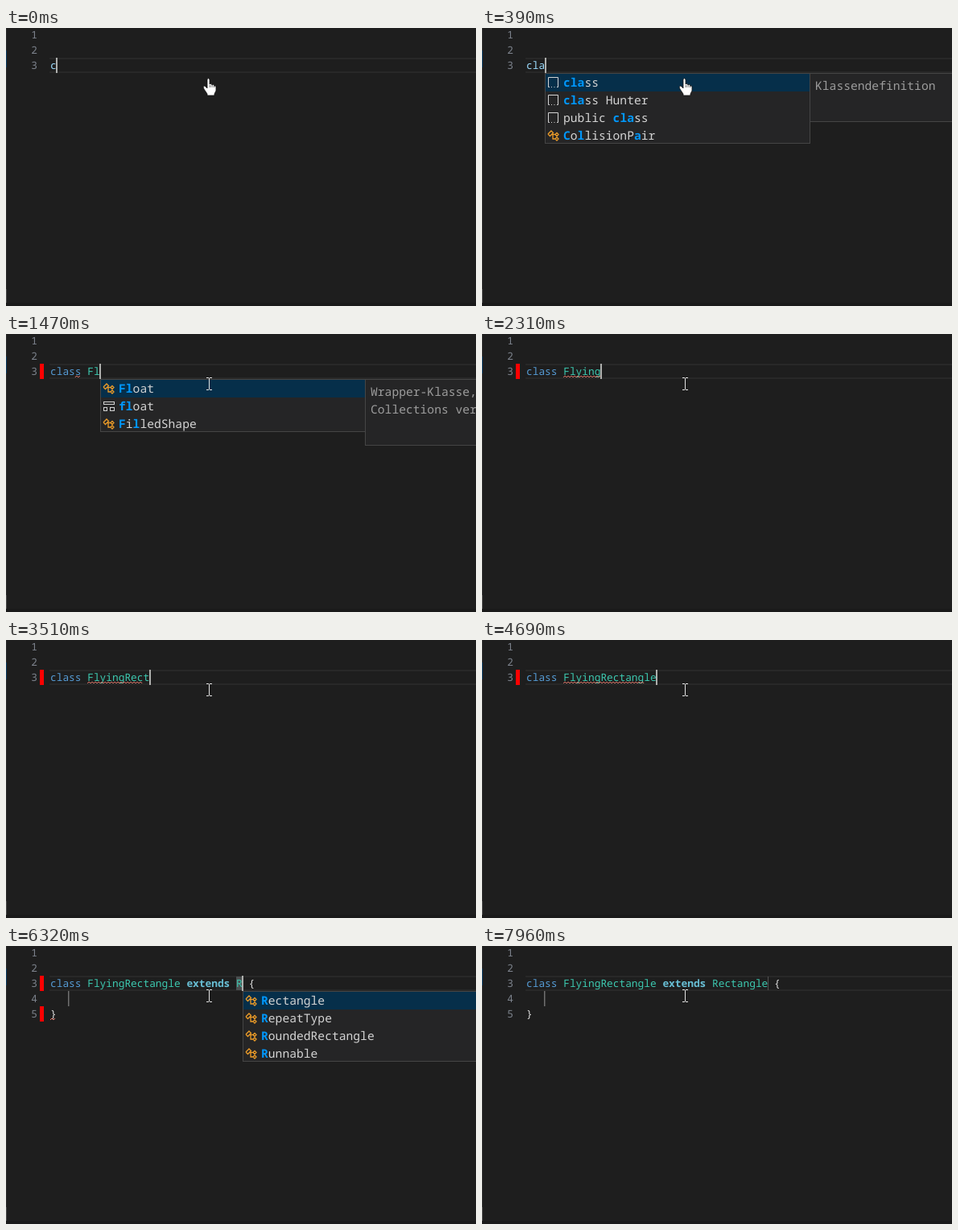
An HTML page with a canvas for the animation above (8000 ms loop, 584x346 px).

```html
<!DOCTYPE html>
<html lang="de">
<head>
<meta charset="utf-8">
<title>Code completion</title>
<style>
html, body { margin: 0; width: 584px; height: 346px; overflow: hidden; background: #1e1e1e; }
canvas { display: block; }
</style>
</head>
<body>
<canvas id="stage" width="584" height="346"></canvas>
<script>
const ctx = document.getElementById('stage').getContext('2d');
ctx.textRendering = 'geometricPrecision';

const LOOP = 8000;
const LEFT = 55, TOP = 37, LINE = 19, CELL = 7.7, ROW = 22, WIDTH = 330;
const FAMILY = '"Noto Sans Mono", "DejaVu Sans Mono", monospace';
const CODE = '12.83px ' + FAMILY, LIST = '14.66px ' + FAMILY;
const COLOR = {
  plain: '#d4d4d4', name: '#9cdcfe', word: '#569cd6', type: '#3dc9b0',
  clause: '#68bed4', match: '#0097fb', number: '#7d838d', edge: '#454545',
  panel: '#252526', focus: '#062f4a', icon: '#ee9d28', wave: '#ee7f70'
};

// Typing: time and the text in front of the caret
const HEAD = 'class FlyingRectangle ';
const typed = [
  [0, 'c'], [250, 'cl'], [390, 'cla'], [550, 'clas'], [680, 'class'], [820, 'class '],
  [1240, 'class F'], [1470, 'class Fl'], [1850, 'class Fly'], [1940, 'class Flyi'],
  [2030, 'class Flyin'], [2310, 'class Flying'], [2550, 'class FlyingR'],
  [2800, 'class FlyingRe'], [3030, 'class FlyingRec'], [3510, 'class FlyingRect'],
  [3630, 'class FlyingRecta'], [3750, 'class FlyingRectan'], [4050, 'class FlyingRectang'],
  [4160, 'class FlyingRectangl'], [4290, 'class FlyingRectangle'], [4920, HEAD],
  [5070, HEAD + 'e'], [5300, HEAD + 'ex'], [5500, HEAD + 'extends '],
  [6320, HEAD + 'extends R'], [6400, HEAD + 'extends Re'], [6550, HEAD + 'extends Rec'],
  [6630, HEAD + 'extends Rect'], [7030, HEAD + 'extends Rectangle']
];

// Suggestions: time, items (kind:label) and documentation lines
const classDoc = ['Klassendefinition', ''];
const floatDoc = ['Wrapper-Klasse, um', 'Collections verwenden', ''];
const lists = [
  [0, ''],
  [110, 's:class|s:class Hunter|s:public class|c:Camera|c:Character|c:Circle|c:Collidable|c:CollisionPair|c:Color|c:Comparable|p:char', classDoc],
  [250, 's:class|s:class Hunter|s:public class|c:Collidable|c:CollisionPair|c:Circle', classDoc],
  [390, 's:class|s:class Hunter|s:public class|c:CollisionPair', classDoc],
  [550, 's:class|s:class Hunter|s:public class', classDoc],
  [820, ''],
  [1240, 'c:Float|p:float|c:FilledShape|s:final|s:for', floatDoc],
  [1470, 'c:Float|p:float|c:FilledShape', floatDoc],
  [1550, ''],
  [5070, 's:extends|s:implements|s:extends {}', ['Erweitert Klasse', '']],
  [5300, 's:extends|s:extends {}', ['Erweitert Klasse', '']],
  [5500, ''],
  [5720, 'c:Actor|c:ArrayList|c:Bitmap|c:Boolean|c:Camera|c:Character|c:Circle|c:Collidable|c:CollisionPair|c:Color|c:Double|c:Ellipse'],
  [6320, 'c:Rectangle|c:RepeatType|c:RoundedRectangle|c:Runnable'],
  [6400, 'c:Rectangle|c:RepeatType|c:RoundedRectangle'],
  [6550, 'c:Rectangle|c:RoundedRectangle'],
  [7030, '']
];

// Error underline on the first code line: time, first and last column
const waves = [
  [0, 0, 0], [960, 4, 5], [1550, 6, 8], [2030, 6, 11], [2310, 6, 12], [3270, 6, 13],
  [3420, 6, 15], [3750, 6, 18], [4400, 6, 19], [5070, 0, 0]
];

const at = (track, t) => track.findLast(step => step[0] <= t);
const colX = col => LEFT + col * CELL;

function box(x, y, w, h, color) {
  ctx.fillStyle = color;
  ctx.fillRect(x, y, w, h);
}

function text(str, x, y, color, font) {
  ctx.font = font;
  ctx.fillStyle = color;
  ctx.fillText(str, x, y);
}

function code(str, col, line, color, bold) {
  text(str, colX(col), TOP + line * LINE + 14, color, (bold ? 'bold ' : '') + CODE);
}

function frame(x, y, w, h) {
  box(x, y, w, h, COLOR.edge);
  box(x + 1, y + 1, w - 2, h - 2, COLOR.panel);
}

function stroke(color, points, width = 1) {
  ctx.strokeStyle = color;
  ctx.lineWidth = width;
  ctx.beginPath();
  points.forEach(([x, y], i) => i ? ctx.lineTo(x, y) : ctx.moveTo(x, y));
  ctx.stroke();
}

function wave(from, to, line) {
  const end = colX(to), y = TOP + line * LINE + 16, points = [];
  for (let x = colX(from), i = 0; x <= end; x += 2, i++) points.push([x, y + (i % 2 ? -1 : 1)]);
  if (points.length > 1) stroke(COLOR.wave, points);
}

function icon(kind, x, y) {
  ctx.save();
  ctx.translate(x, y);
  if (kind === 's') {
    stroke(COLOR.plain, [[3, 13.5], [1.5, 13.5], [1.5, 1.5], [13.5, 1.5], [13.5, 13.5], [12, 13.5]]);
    stroke(COLOR.plain, [[5, 13.5], [6, 13.5]]);
    stroke(COLOR.plain, [[8.5, 13.5], [9.5, 13.5]]);
  } else if (kind === 'c') {
    const c = COLOR.icon;
    stroke(c, [[1, 6], [5, 2], [7.5, 4.5], [3.5, 8.5], [1, 6]], 1.3);
    stroke(c, [[6, 6.5], [11, 6.5]], 1.3);
    stroke(c, [[7, 6.5], [7, 12], [10, 12]], 1.3);
    for (const dy of [6.5, 12])
      stroke(c, [[10, dy], [12, dy - 2], [14, dy], [12, dy + 2], [10, dy]], 1.3);
  } else {
    ctx.strokeStyle = COLOR.plain;
    ctx.lineWidth = 1;
    ctx.strokeRect(1.5, 2.5, 13, 3);
    ctx.strokeRect(1.5, 9.5, 4, 4);
    ctx.strokeRect(9.5, 9.5, 5, 4);
  }
  ctx.restore();
}

// Indices of the letters that fit the word being typed
function hits(label, word) {
  const low = label.toLowerCase(), w = word.toLowerCase(), start = low.indexOf(w);
  const found = new Set();
  let pos = -1;
  [...w].forEach((ch, i) => {
    pos = start >= 0 ? start + i : low.indexOf(ch, pos + 1);
    found.add(pos);
  });
  return found;
}

function popup(col, [, items, doc], word) {
  if (!items) return;
  const rows = items.split('|'), x = Math.round(colX(col)), y = TOP + LINE;
  frame(x, y, WIDTH, rows.length * ROW);
  box(x + 1, y + 1, WIDTH - 2, ROW, COLOR.focus);
  rows.forEach((row, r) => {
    const label = row.slice(2), found = hits(label, word), rowY = y + r * ROW;
    icon(row[0], x + 3, rowY + 4);
    let cx = x + 23;
    for (let i = 0; i < label.length;) {
      const hit = found.has(i);
      let end = i + 1;
      while (end < label.length && found.has(end) === hit) end++;
      text(label.slice(i, end), cx, rowY + 17, hit ? COLOR.match : COLOR.plain, (hit ? 'bold ' : '') + LIST);
      cx += (end - i) * 8.8;
      i = end;
    }
  });
  if (!doc) return;
  frame(x + WIDTH - 1, y, 400, doc.length * ROW + 17);
  doc.forEach((str, i) => text(str, x + WIDTH + 6, y + 21 + i * ROW, '#9d9d9d', LIST));
}

function hand() {
  const p = new Path2D('M250 64Q251 61 253 64V70Q255 68 256 71Q258 69 259 72Q261 71 261 74V78L259 82V84H250V82L246 76Q244 72 247 72L250 75Z');
  ctx.fillStyle = '#fff';
  ctx.fill(p);
  ctx.strokeStyle = '#111';
  ctx.lineWidth = 0.8;
  ctx.stroke(p);
  for (const x of [253.5, 256, 258.5]) stroke('#222', [[x, 71], [x, 74]], 0.7);
}

function beam() {
  const c = '#e4e4e4';
  box(252, 55, 1, 14, c);
  for (const y of [54, 69]) {
    box(249, y, 3, 1, c);
    box(253, y, 3, 1, c);
  }
}

function editor(t, before) {
  const hasBody = t >= 5500, done = t >= 7030, clean = t >= 7200;

  box(0, 0, 584, 346, '#1e1e1e');
  box(0, 0, 1, 346, '#2c2c2c');
  box(0, 28, 1, 21, '#0b3c61');
  box(0, 325, 1, 17, '#4a4a4a');
  box(0, 342, 584, 4, '#1a1a1a');
  box(54, TOP, 530, 2, '#282828');
  box(54, TOP + LINE - 2, 530, 2, '#282828');

  for (let n = 1; n <= (hasBody ? 5 : 3); n++)
    text(n, 31.3, TOP + (n - 3) * LINE + 14, COLOR.number, CODE);

  if (t >= 960 && !clean) box(42, TOP, 5, LINE, '#f00');
  if (t >= 5900 && !clean) box(42, TOP + 2 * LINE, 5, LINE, '#f00');

  if (hasBody && !done && before.length > 30)
    box(colX(30), TOP + 1, (before.length - 30) * CELL, LINE - 2, '#4b4f50');

  if (before.length < 5) code(before, 0, 0, COLOR.name);
  else {
    code('class', 0, 0, COLOR.word);
    code(before.slice(6, 21), 6, 0, COLOR.type);
    code(before.slice(22, 29), 22, 0, hasBody ? COLOR.clause : COLOR.name, hasBody);
    code(before.slice(30), 30, 0, COLOR.type);
  }

  const [, from, to] = at(waves, t);
  wave(from, to, 0);

  if (hasBody) {
    code('{', before.length + 1, 0, '#dcdcdc');
    box(77, TOP + LINE, 1.5, LINE, '#707070');
    code('}', 0, 2, '#dcdcdc');
    if (t >= 5900 && !clean) wave(0, 1, 2);
  }

  const caretX = Math.round(colX(before.length) - 0.4);
  if (done) box(355, TOP + 1, 1, LINE - 2, '#525252');
  if (t < 7960) box(caretX, TOP, 2, LINE, '#aeafad');
}

function draw(t) {
  const before = at(typed, t)[1];
  editor(t, before);
  popup(before.length, at(lists, t), before.split(' ').pop());
  if (t < 820) hand();
  else beam();
}

let start;
function tick(now) {
  start ??= now;
  draw((now - start) % LOOP);
  requestAnimationFrame(tick);
}
draw(0);
requestAnimationFrame(tick);
</script>
</body>
</html>
```
